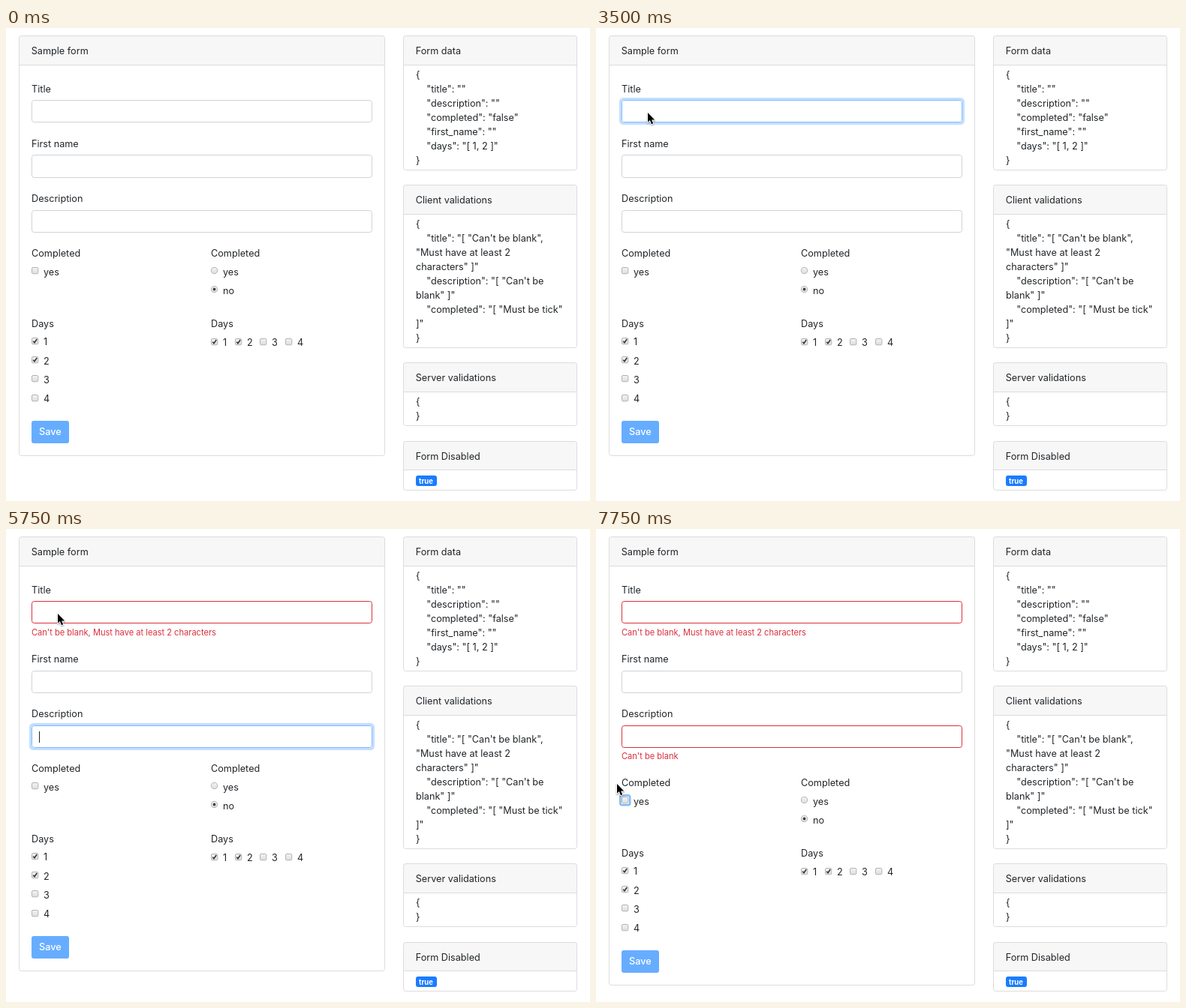
An HTML page with a canvas for the animation above (8 s loop, 778 px wide and 631 px high).

```html
<!DOCTYPE html>
<html lang="en">
<head>
<meta charset="utf-8">
<title>Form validation</title>
<style>
  html, body { margin: 0; width: 100%; height: 100%; overflow: hidden; background: #fff; }
  canvas { display: block; }
</style>
</head>
<body>
<canvas id="stage" width="778" height="631"></canvas>
<script>
const ctx = document.getElementById('stage').getContext('2d');
const LOOP = 8000;
const FONT = 'Inter, "Open Sans", sans-serif';
const INK = '#212529', RED = '#d9303f', LINE = '#dcdcdc', BLUE = '#1a7cff';

// Pointer stops: time, x, y
const POINTER = [
  [500, 209, 44], [750, 194, 60], [1000, 116, 111], [1250, 100, 113], [1500, 98, 113],
  [2000, 69, 113], [7250, 78, 211], [7500, 27, 337], [7750, 28, 340]
];

const PANELS = [
  { title: 'Form data', y: 10, h: 180, lines: [
    '{', '    "title": ""', '    "description": ""', '    "completed": "false"',
    '    "first_name": ""', '    "days": "[ 1, 2 ]"', '}'] },
  { title: 'Client validations', y: 209, h: 218, lines: [
    '{', '    "title": "[ "Can\'t be blank",', '"Must have at least 2', 'characters" ]"',
    '    "description": "[ "Can\'t be', 'blank" ]"', '    "completed": "[ "Must be tick"', ']"', '}'] },
  { title: 'Server validations', y: 446, h: 85, lines: ['{', '}'] },
  { title: 'Form Disabled', y: 551, h: 66, lines: [] }
];

function text(str, x, y, color = INK, size = 12.67, weight = 400) {
  ctx.font = `${weight} ${size}px ${FONT}`;
  ctx.fillStyle = color;
  ctx.fillText(str, x, y);
}

function roundPath(x, y, w, h, r) {
  ctx.beginPath();
  ctx.roundRect(x, y, w, h, r);
}

function fillBox(x, y, w, h, r, color) {
  roundPath(x, y, w, h, r);
  ctx.fillStyle = color;
  ctx.fill();
}

function strokeBox(x, y, w, h, r, color) {
  roundPath(x + 0.5, y + 0.5, w - 1, h - 1, r);
  ctx.strokeStyle = color;
  ctx.lineWidth = 1;
  ctx.stroke();
}

function card(title, x, y, w, h) {
  const head = title === 'Form Disabled' ? 38 : 39;
  fillBox(x, y, w, head, [3, 3, 0, 0], '#f7f7f7');
  ctx.fillStyle = LINE;
  ctx.fillRect(x, y + head, w, 1);
  strokeBox(x, y, w, h, 3, LINE);
  text(title, x + 16.7, y + 25);
}

function input(y, h, { focus, invalid, caret }) {
  if (focus) fillBox(31, y - 3, 460, h + 6, 5.5, '#c2deff');
  fillBox(34, y, 454, h, 3, '#fff');
  strokeBox(34, y, 454, h, 3, focus ? '#84bbfb' : invalid ? RED : '#ced4da');
  if (caret) {
    ctx.fillStyle = '#222';
    ctx.fillRect(44, y + 8, 1, 15);
  }
}

function controlPaint(y) {
  const g = ctx.createLinearGradient(0, y, 0, y + 9);
  g.addColorStop(0, '#f5f5f5');
  g.addColorStop(1, '#dddddd');
  ctx.fillStyle = g;
  ctx.strokeStyle = '#b2b2b2';
  ctx.lineWidth = 1;
}

function checkbox(x, y, checked, focus) {
  if (focus) {
    roundPath(x - 1.7, y - 1.7, 12.9, 12.9, 2.5);
    ctx.strokeStyle = '#83bbf8';
    ctx.lineWidth = 2.6;
    ctx.stroke();
  }
  roundPath(x + 0.5, y + 0.5, 8.3, 8.3, 1.5);
  controlPaint(y);
  ctx.fill();
  ctx.stroke();
  if (!checked) return;
  ctx.beginPath();
  ctx.moveTo(x + 2.2, y + 4.7);
  ctx.lineTo(x + 4, y + 6.7);
  ctx.lineTo(x + 7.2, y + 2);
  ctx.strokeStyle = '#333';
  ctx.lineWidth = 1.6;
  ctx.stroke();
}

function radio(x, y, checked) {
  ctx.beginPath();
  ctx.arc(x, y, 4.1, 0, 7);
  controlPaint(y - 4.5);
  ctx.fill();
  ctx.stroke();
  if (!checked) return;
  ctx.beginPath();
  ctx.arc(x, y, 1.9, 0, 7);
  ctx.fillStyle = '#444';
  ctx.fill();
}

function pointer(t) {
  const stop = POINTER.filter(p => p[0] <= t).pop();
  if (!stop) return;
  ctx.save();
  ctx.translate(stop[1], stop[2]);
  ctx.beginPath();
  ctx.moveTo(0, 0);
  for (const [x, y] of [[0, 12.8], [2.9, 10.1], [5, 15.2], [7.2, 14.3], [5.1, 9.4], [9.2, 9.4]]) ctx.lineTo(x, y);
  ctx.closePath();
  ctx.lineJoin = 'round';
  ctx.lineWidth = 2;
  ctx.strokeStyle = '#fff';
  ctx.shadowColor = 'rgba(0,0,0,.4)';
  ctx.shadowBlur = 2;
  ctx.shadowOffsetY = 1;
  ctx.stroke();
  ctx.shadowColor = 'transparent';
  ctx.fillStyle = '#000';
  ctx.fill();
  ctx.restore();
}

function form(t) {
  const titleError = t >= 4000, textError = t >= 6250;
  const shift = titleError ? 19 : 0;
  const low = shift + (textError ? 19 : 0);
  const within = (a, b) => t >= a && t < b;

  card('Sample form', 17, 10, 488, 561 + low);

  text('Title', 34, 86);
  input(96, 30, { focus: within(3000, 4000), invalid: titleError, caret: within(3000, 3500) });
  if (titleError) text("Can't be blank, Must have at least 2 characters", 34, 142, RED, 11.08);

  text('First name', 34, 159 + shift);
  input(titleError ? 189 : 169, titleError ? 30 : 31, {
    focus: within(4000, 5750),
    caret: within(4000, 4500) || within(5000, 5500)
  });

  text('Description', 34, 232 + shift);
  input(243 + shift, 30, {
    focus: within(5750, 6500), invalid: t >= 6500, caret: within(5750, 6250)
  });
  if (textError) text("Can't be blank", 34, 307, RED, 11.08);

  ctx.save();
  ctx.translate(0, low);
  for (const x of [34, 273]) {
    text('Completed', x, 305);
    text('Days', x, 399);
  }
  checkbox(34, 319, false, textError);
  text('yes', 50, 330);
  radio(277.5, 323.5, false);
  text('yes', 289, 330);
  radio(277.5, 348.5, true);
  text('no', 289, 355);

  [273, 305, 338, 372].forEach((x, i) => {
    checkbox(34, Math.round(413 + 25.2 * i), i < 2);
    text(i + 1, 50, Math.round(423.4 + 25.3 * i));
    checkbox(x, 414, i < 2);
    text(i + 1, x + 16, 424);
  });

  fillBox(34, 524, 50, 30, 3, '#67adff');
  text('Save', 44, 543, '#fff', 12.67, 500);
  ctx.restore();
}

function panels() {
  for (const { title, y, h, lines } of PANELS) {
    card(title, 529, y, 232, h);
    lines.forEach((line, i) => text(line, 546, y + 57 + 19 * i));
  }
  fillBox(546, 597, 28, 14, 3, BLUE);
  text('true', 550, 608, '#fff', 9.5, 700);
}

function draw(now) {
  const t = now % LOOP;
  ctx.fillStyle = '#fff';
  ctx.fillRect(0, 0, 778, 631);
  form(t);
  panels();
  pointer(t);
}

const start = performance.now();
function tick() {
  draw(performance.now() - start);
  requestAnimationFrame(tick);
}
tick();
</script>
</body>
</html>
```
